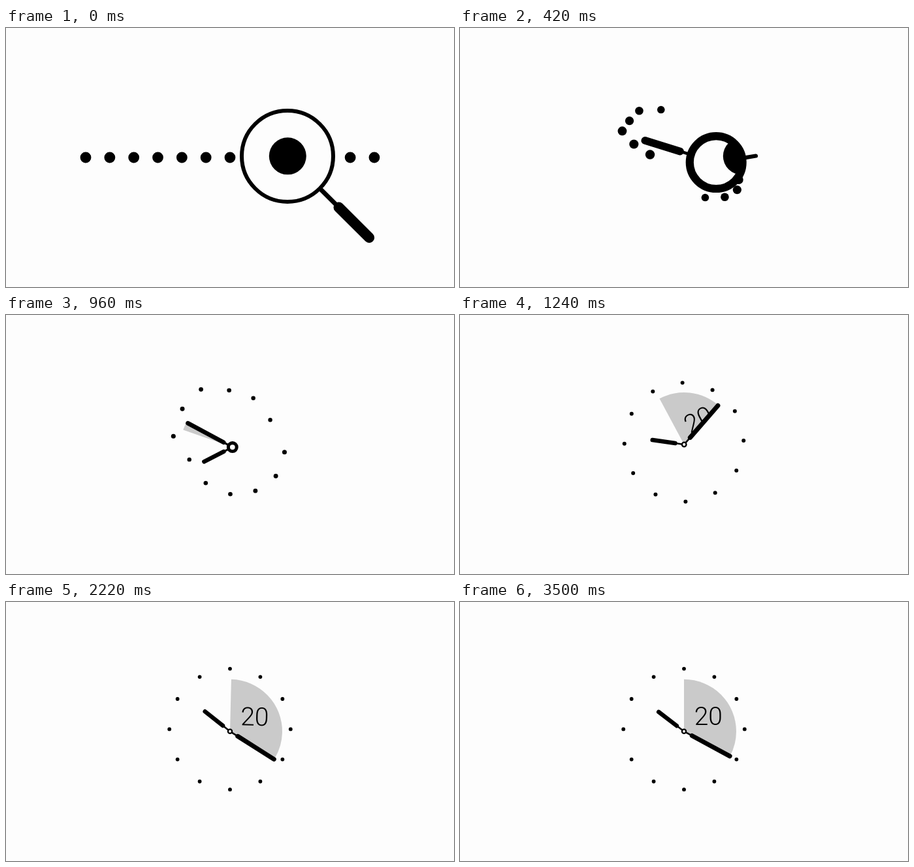
Write an HTML page with a canvas that moves like this. It is 686 px wide and 398 px high and loops after 3.52 s.

```html
<!DOCTYPE html>
<html lang="en">
<head>
<meta charset="utf-8">
<title>Lens to clock</title>
<style>
  html, body { margin: 0; width: 100%; height: 100%; overflow: hidden; background: #fdfdfd; }
  canvas { display: block; }
</style>
</head>
<body>
<canvas id="stage" width="686" height="398"></canvas>
<script>
const LOOP = 3520;
const INK = '#000', PAPER = '#fdfdfd', WEDGE = '#cacaca';
const KEYS = [0, 260, 680, 1240, 1660, 2220, 2780, 3500];
const RAD = Math.PI / 180;
const ctx = document.getElementById('stage').getContext('2d');

// Monotone cubic curve through the given values; holds the last one.
function track(values, times = KEYS) {
  const last = values.length - 1;
  const slope = i => (values[i + 1] - values[i]) / (times[i + 1] - times[i]);
  const tangent = values.map((v, i) => {
    if (i === 0 || i === last) return 0;
    const a = slope(i - 1), b = slope(i);
    return a * b > 0 ? 2 * a * b / (a + b) : 0;
  });
  return t => {
    if (t >= times[last]) return values[last];
    let i = 0;
    while (t >= times[i + 1]) i++;
    const d = times[i + 1] - times[i], u = (t - times[i]) / d, w = 1 - u;
    return values[i] * w * w * (1 + 2 * u) + values[i + 1] * u * u * (3 - 2 * u)
      + d * u * w * (tangent[i] * w - tangent[i + 1] * u);
  };
}

const lens = {
  x: track([431, 415.5, 355.7, 343.2, 343]),
  y: track([197, 206, 207, 199, 198.8]),
  r: track([70, 57.5, 14, 3.3, 3.1]),
  width: track([6, 13, 9.3, 2.3, 2.3])
};
const minute = {
  angle: track([135, 181, 516, 760.6, 849, 842.5, 840, 838.5]),
  from: track([111, 86, 20, 14, 14]),
  to: track([177, 145, 76.5, 79, 79.8]),
  width: track([16, 15, 6.5, 7, 7]),
  stem: track([7, 5, 4, 2.6, 2.6])
};
const hour = {
  angle: track([4, 26.6, 190.6, 278, 310.6, 308.6, 307.9, 307.6]),
  from: track([30, 28, 18, 13.8, 14]),
  to: track([66, 68, 48.6, 49, 49]),
  width: track([7, 6, 6.5, 6.5, 6.5]),
  stem: track([7, 5, 4, 2.6, 2.6])
};
const wedgeStart = track([-100, -100, -100, -28.2, 4, 1.4, 0.5, 0]);

// Dots, counted from each end of the row towards its middle.
const HUB = { x: 343, y: 195.4 };
const ROW_Y = 199, GAP = 36.83;
const SWIRL = {
  left: [[388, 173], [371, 139.5], [342.5, 126.5], [301.5, 110], [279, 138.5], [266.5, 177]],
  right: [[299.5, 207], [313, 242], [342, 264.5], [374, 267], [401, 253], [410, 223]]
};

function polar([x, y], isRight) {
  const dx = x - HUB.x, dy = y - HUB.y;
  let angle = Math.atan2(dx, -dy) / RAD;
  if (isRight && angle < 0) angle += 360;
  return { angle, r: Math.hypot(dx, dy) };
}

function makeDot(side, k) {
  const isRight = side === 'right';
  const x = HUB.x + (isRight ? 1 : -1) * (6 - k) * GAP;
  const bend = Math.exp(-0.5 * k - 0.12 * k * k);
  const curl = isRight
    ? [x - 56 * 0.41 ** k, ROW_Y + 22 * bend]
    : [x + 52 * 0.33 ** k, ROW_Y - 38 * bend];
  const [a, b, c] = [[x, ROW_Y], curl, SWIRL[side][k]].map(p => polar(p, isRight));
  const end = (isRight ? 240 : 60) - 30 * k;
  const mid = b.r + (c.r - b.r) * (0.9 - 0.08 * k);
  return {
    angle: track([a.angle, b.angle, c.angle, end - 1.5, end]),
    dist: track([a.r, b.r, mid, c.r, 91.3, 92.8], [0, 260, 470, 680, 1240, 1660]),
    size: track([8.4, 8.4 - 1.1 * 0.6 ** k, 3.6 + 0.2 * k, 3, 2.9])
  };
}
const dots = ['left', 'right'].flatMap(side => SWIRL[side].map((p, k) => makeDot(side, k)));
const middleDot = track([8.4, 0], [0, 240]);

function disc(x, y, r, fill = INK) {
  ctx.beginPath();
  ctx.arc(x, y, Math.max(r, 0), 0, 2 * Math.PI);
  ctx.fillStyle = fill;
  ctx.fill();
}

function bar(from, to, width) {
  ctx.beginPath();
  ctx.moveTo(0, -from);
  ctx.lineTo(0, -to);
  ctx.lineWidth = width;
  ctx.stroke();
}

function drawHand(hand, x, y, t) {
  ctx.save();
  ctx.translate(x, y);
  ctx.rotate(hand.angle(t) * RAD);
  ctx.lineCap = 'round';
  bar(0, hand.from(t), hand.stem(t));
  bar(hand.from(t), hand.to(t), hand.width(t));
  ctx.restore();
}

function drawWedge(x, y, t) {
  const start = wedgeStart(t);
  const sweep = Math.min(minute.angle(t) - 720 - start, 120);
  if (sweep <= 0) return;
  ctx.save();
  ctx.translate(x, y);
  ctx.rotate(start * RAD);
  ctx.beginPath();
  ctx.moveTo(0, 0);
  ctx.arc(0, 0, 80, -90 * RAD, (sweep - 90) * RAD);
  ctx.closePath();
  ctx.fillStyle = WEDGE;
  ctx.fill();
  ctx.clip();
  ctx.fillStyle = INK;
  ctx.font = '300 39px Roboto, Inter, sans-serif';
  ctx.textAlign = 'center';
  ctx.fillText('20', 37.3, -10);
  ctx.restore();
}

function drawLens(x, y, t) {
  const r = lens.r(t);
  disc(x, y, r, PAPER);
  ctx.save();
  ctx.beginPath();
  ctx.arc(x, y, r, 0, 2 * Math.PI);
  ctx.clip();
  disc(431.3, 196.8, 28.5);
  ctx.restore();
  ctx.beginPath();
  ctx.arc(x, y, r, 0, 2 * Math.PI);
  ctx.lineWidth = lens.width(t);
  ctx.stroke();
}

function draw(t) {
  ctx.fillStyle = PAPER;
  ctx.fillRect(0, 0, 686, 398);
  ctx.strokeStyle = INK;
  const x = lens.x(t), y = lens.y(t);
  drawWedge(x, y, t);
  disc(HUB.x, ROW_Y, middleDot(t));
  for (const dot of dots) {
    const a = dot.angle(t) * RAD, d = dot.dist(t);
    disc(HUB.x + d * Math.sin(a), HUB.y - d * Math.cos(a), dot.size(t));
  }
  drawHand(hour, x, y, t);
  drawHand(minute, x, y, t);
  drawLens(x, y, t);
}

const begin = performance.now();
function tick() {
  draw((performance.now() - begin) % LOOP);
  requestAnimationFrame(tick);
}
tick();
</script>
</body>
</html>
```
